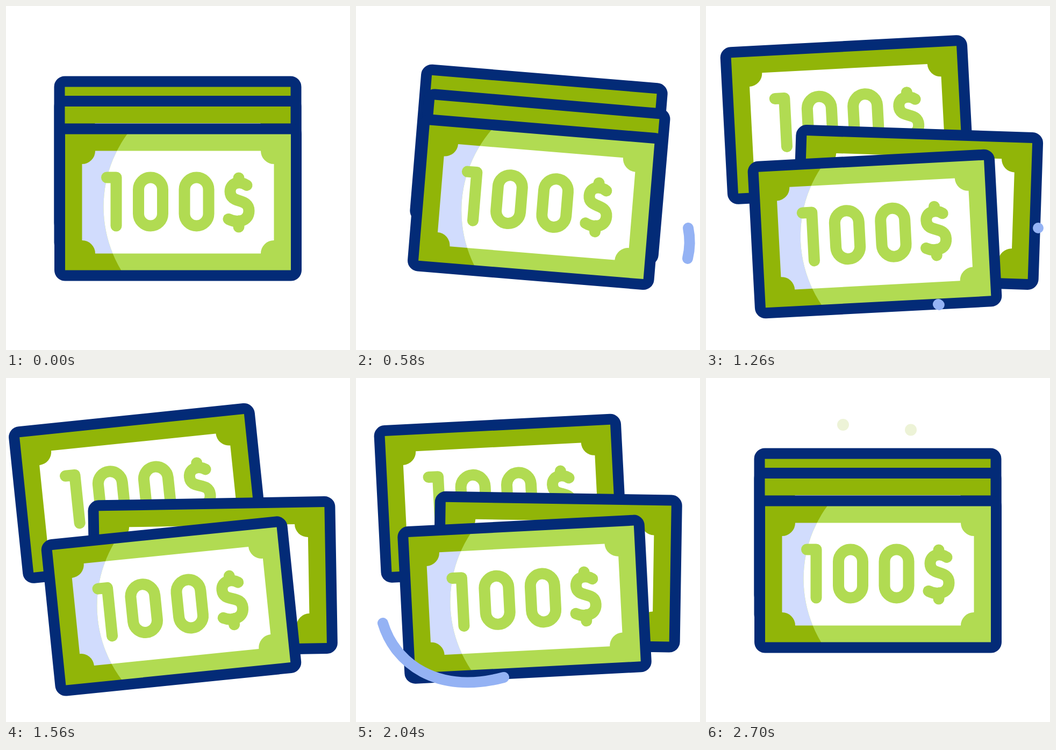
Recreate the animation shown at these times as an HTML page. Size 640 by 640 pixels, loop 3260 ms.

```html
<!DOCTYPE html>
<html lang="en">
<head>
<meta charset="utf-8">
<style>
  html, body { margin: 0; width: 100%; height: 100%; overflow: hidden; background: #fff; }
  svg { display: block; width: 100vw; height: 100vh; }
</style>
</head>
<body>
<svg viewBox="0 0 640 640">
  <defs>
    <path id="panel" d="M-154-95.500H154A24.500 24.500 0 0 0 178.500-71V71A24.500 24.500 0 0 0 154 95.500H-154A24.500 24.500 0 0 0-178.500 71V-71A24.500 24.500 0 0 0-154-95.500Z"/>
    <rect id="paper" x="-220" y="-136.500" width="440" height="273" rx="10"/>
    <g id="amount" transform="translate(-320 -365)" fill="none" stroke="#b1db52" stroke-width="21" stroke-linecap="round" stroke-linejoin="round">
      <path d="M187.500 319H205V409M433 320V328M433 400V411"/>
      <rect x="246.500" y="319" width="45" height="90" rx="22.500"/>
      <rect x="332" y="319" width="45" height="90" rx="22.500"/>
      <path d="M448 333.500C436 325 417 328 417 345C417 369 452 356 452 381C452 402 429 404 414 396.500"/>
    </g>
    <g id="note">
      <use href="#paper" fill="#91b508"/>
      <use href="#panel" fill="#fff"/>
      <use href="#amount"/>
      <use href="#paper" fill="none" stroke="#032b77" stroke-width="20"/>
    </g>
    <clipPath id="light"><circle cx="91.500" cy="8.500" r="230"/></clipPath>
  </defs>
  <g fill="#91b508"><circle class="dot" r="11"/><circle class="dot" r="11"/></g>
  <use class="bill" href="#note"/>
  <use class="bill" href="#note"/>
  <g class="bill">
    <use href="#paper" fill="#91b508"/>
    <use href="#panel" fill="#d1dcfd"/>
    <g clip-path="url(#light)">
      <use href="#paper" fill="#b1db52"/>
      <use href="#panel" fill="#fff"/>
    </g>
    <use href="#amount"/>
    <use href="#paper" fill="none" stroke="#032b77" stroke-width="20"/>
  </g>
  <g fill="none" stroke="#94b2f4" stroke-width="20" stroke-linecap="round">
    <path class="arc" pathLength="1" d="M618 413A130 130 0 0 1 432 555"/>
    <path class="arc" pathLength="1" d="M50 456C72 530 150 590 275 557"/>
  </g>
</svg>
<script>
const LOOP = 3260;
const times = [220, 580, 920, 1260, 1600, 1950, 2240, 2380];

// x, y and angle of each bill: stacked, tilted, swung left, swung right, before closing, landing
const poses = [
  [[319.5, 277, 0], [340, 272, 4.7], [246.5, 214.5, -6], [263, 211.5, -3], [257.7, 212.7, -3.75], [311.5, 262, 0]],
  [[319.5, 313.5, 0], [344.4, 318.4, 4.9], [384.4, 370, -1.1], [393, 374.5, 1.9], [389.8, 373.6, 1.15], [322.5, 316, 0.1]],
  [[320, 365, 0], [335.7, 364.8, 4.7], [307.3, 424.5, -5.9], [314, 424, -3], [311.7, 424, -3.78], [320, 369, 0]]
];
const order = [0, 1, 2, 3, 2, 4, 5, 0];

const all = name => [...document.querySelectorAll(name)];
const bills = all('.bill'), arcs = all('.arc'), dots = all('.dot');

const ease = (t, from, to) => {
  const p = Math.min(1, Math.max(0, (t - from) / (to - from)));
  return (1 - Math.cos(Math.PI * p)) / 2;
};

function placeBill(bill, pose, t) {
  let i = 0;
  while (i < times.length - 2 && t > times[i + 1]) i++;
  const k = ease(t, times[i], times[i + 1]);
  const a = pose[order[i]], b = pose[order[i + 1]];
  const [x, y, angle] = a.map((v, n) => v + (b[n] - v) * k);
  bill.setAttribute('transform', `translate(${x} ${y}) rotate(${angle})`);
}

function trimArc(arc, tail, head) {
  arc.style.display = head > tail ? '' : 'none';
  arc.setAttribute('stroke-dasharray', `0 ${tail} ${head - tail} 2`);
}

function placeDot(dot, x, y, t) {
  const rise = ease(t, 2400, 2560), fall = ease(t, 2560, 2700);
  dot.setAttribute('cx', x);
  dot.setAttribute('cy', 150 + (y - 162) * rise + 12 * fall);
  dot.setAttribute('opacity', t < 2400 ? 0 : 1 - 0.84 * ease(t, 2480, 2700));
}

function draw(now) {
  const t = now % LOOP;
  bills.forEach((bill, i) => placeBill(bill, poses[i], t));
  trimArc(arcs[0], ease(t, 920, 1280), ease(t, 420, 970));
  trimArc(arcs[1], ease(t, 2050, 2500), ease(t, 1680, 2040));
  placeDot(dots[0], 255, 87, t);
  placeDot(dots[1], 381, 96.5, t);
  requestAnimationFrame(draw);
}
requestAnimationFrame(draw);
</script>
</body>
</html>
```
